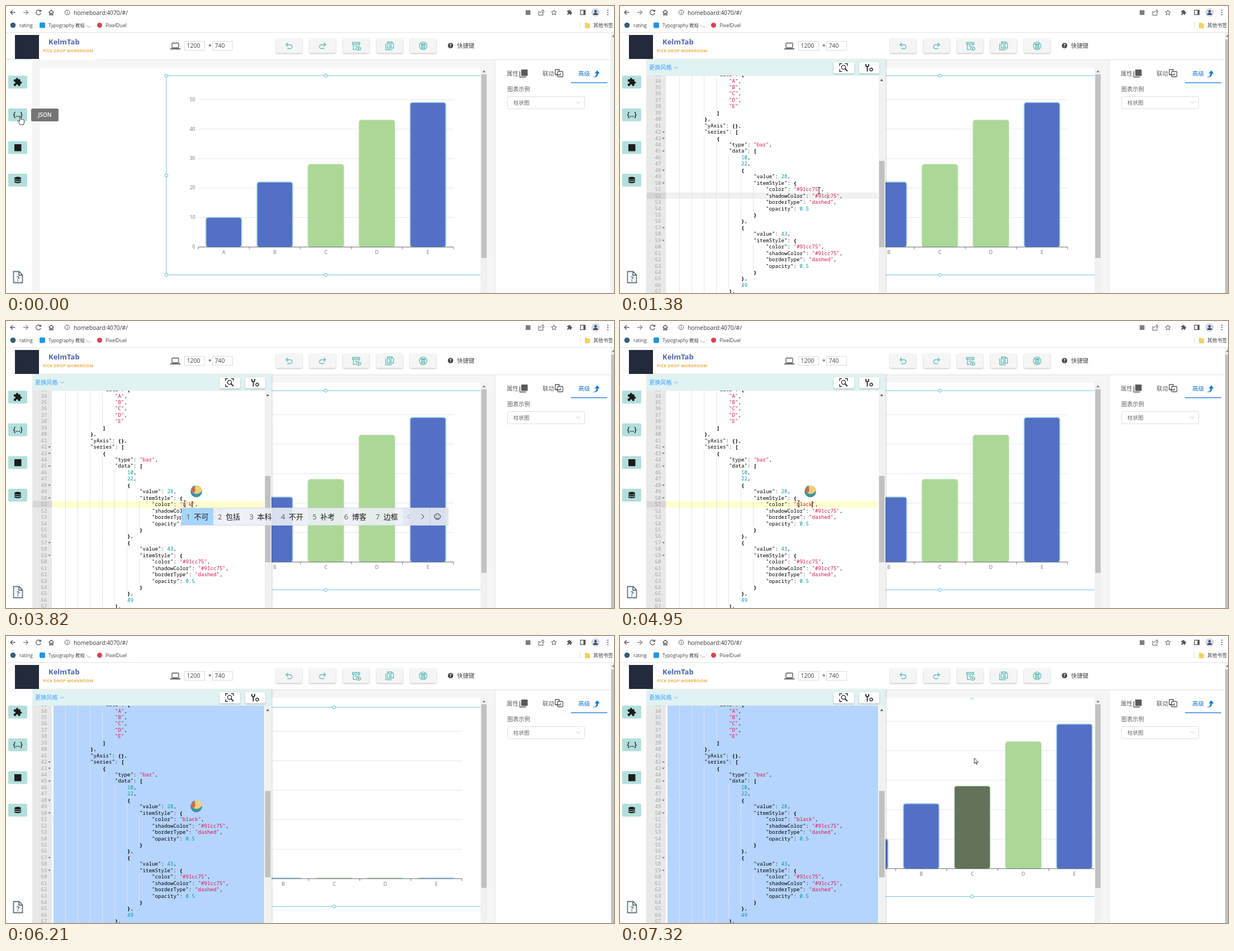
Recreate the animation shown at these times as an HTML page. Size 1088 by 515 pixels, loop 8.18 s.

```html
<!DOCTYPE html>
<html lang="zh">
<head>
<meta charset="utf-8">
<style>
html, body { margin: 0; width: 100%; height: 100%; overflow: hidden; background: #fff; }
#stage { position: absolute; left: 0; top: 0; width: 1088px; height: 515px; overflow: hidden; }
#scene { position: absolute; left: 0; top: 0; }
text, #ime { font-family: "Open Sans", "Noto Sans CJK SC", "Noto Sans CJK", sans-serif; white-space: pre; }
.mid { text-anchor: middle; }
.end { text-anchor: end; }
.ln { fill: none; stroke: currentColor; stroke-width: 1.3; }
.thin { stroke-width: 1; }
.thick { stroke-width: 1.8; }
.code text { font: 9.167px "Noto Sans Mono", monospace; }
.code .str { fill: #d14; }
.code .num { fill: #099; }
.code .br { font-weight: bold; }
.key { fill: #f5f5f5; filter: drop-shadow(0 1.5px 1px rgba(0,0,0,.28)); }
.teal { color: #5dbab8; }

#tip, #thumb, #drawer, #hand, #beam, #arrow, #bowl, #drag, .bar, #dark { animation: 8180ms linear infinite; }
#tip { animation-name: tip; }
#thumb { animation-name: thumb; }
#drawer { animation-name: drawer; }
#hand { animation-name: hand; }
#beam { animation-name: beam; }
#arrow { animation-name: arrow; }
#bowl { animation-name: bowl; transform-origin: 340px 306px; }
#drag { animation-name: drag; }
.bar { animation-name: grow; rx: 4px; filter: drop-shadow(0 0 1.2px var(--glow)); }
#dark { animation-name: grow, darken; }

@keyframes tip { 0%, 5% { opacity: 1 } 6.8%, 100% { opacity: 0 } }
@keyframes thumb { 0%, 4.9% { opacity: 0 } 4.91%, 100% { opacity: 1 } }
@keyframes drawer {
  0%, 4.9% { transform: translateX(-432px); animation-timing-function: cubic-bezier(.4,0,.2,1) }
  8.2%, 100% { transform: none }
}
@keyframes hand {
  0%, 4.6% { transform: translate(26px,205px); opacity: 1 }
  6.1% { transform: translate(48px,215px); opacity: 1 }
  6.11%, 100% { transform: translate(48px,215px); opacity: 0 }
}
@keyframes beam {
  0%, 6.1% { transform: translate(48px,215px); opacity: 0 }
  6.11% { transform: translate(48px,215px); opacity: 1; animation-timing-function: ease-out }
  13.7% { transform: translate(366px,336px) }
  15.6%, 18.2% { transform: translate(356px,331px); animation-timing-function: ease-in-out }
  24.2%, 63.6% { transform: translate(320px,328px) }
  64.55%, 66.9% { transform: translate(372px,385px) }
  70.17% { transform: translate(436px,495px); opacity: 1 }
  70.18%, 100% { transform: translate(436px,495px); opacity: 0 }
}
@keyframes arrow {
  0%, 76.6% { transform: translate(584px,230px); opacity: 0 }
  76.61% { transform: translate(584px,230px); opacity: 1; animation-timing-function: ease-out }
  85.4%, 89.48% { transform: translate(626px,212px) }
  89.49%, 100% { transform: translate(634px,219px); opacity: 1 }
}
@keyframes bowl {
  0%, 24.93% { opacity: 0; transform: scale(.5) }
  24.94% { opacity: 1; transform: scale(.5) }
  27% { transform: scale(1.08) }
  28.5%, 76.5% { opacity: 1; transform: none }
  76.9%, 100% { opacity: 0; transform: none }
}
@keyframes drag {
  0%, 75.85% { transform: none }
  75.86%, 76.3% { transform: translate(15px,3px); animation-timing-function: ease-out }
  85.4%, 100% { transform: translate(58px,-15px) }
}
@keyframes grow {
  0%, 75.85% { y: var(--y); height: var(--h) }
  75.86%, 76.3% { y: 431.3px; height: .7px; animation-timing-function: cubic-bezier(.215,.61,.355,1) }
  87.8%, 100% { y: var(--y); height: var(--h) }
}
@keyframes darken { 0%, 76.3% { fill: #abd897 } 76.31%, 100% { fill: #62725b } }

#ime {
  position: absolute; left: 314px; top: 335px; height: 30px; display: none;
  border: 1px solid #d3d8e4; border-width: 1px 0; 
  background: rgba(236,239,246,.88); font-size: 13px; line-height: 30px; color: #1c1c1c;
}
#ime span { padding: 0 8px 0 8.5px; flex: none; }
#ime span:first-child { background: #a5d5fb; }
#ime i { font-style: normal; color: #555; display: inline-block; width: 14px; }
#ime svg { flex: none; background: rgba(218,223,238,.6); color: #222; }
</style>
</head>
<body>
<div id="stage">
<svg id="scene" width="1088" height="515" viewBox="0 0 1088 515">
  <defs>
    <clipPath id="board"><rect x="61" y="111" width="788" height="404"/></clipPath>
    <clipPath id="pane"><rect x="47" y="125" width="428" height="390"/></clipPath>
    <path id="puzzle" d="M20.5 11H19V7c0-1.1-.9-2-2-2h-4V3.500a2.500 2.500 0 0 0-5 0V5H4c-1.1 0-2 .9-2 2v3.800h1.500a2.700 2.700 0 0 1 0 5.400H2V20c0 1.1.9 2 2 2h3.800v-1.500a2.700 2.700 0 0 1 5.400 0V22H17c1.1 0 2-.9 2-2v-4h1.500a2.500 2.500 0 0 0 0-5z"/>
    <path id="down" d="M-3.5-1.8L0 1.8L3.5-1.8"/>
  </defs>
  <rect width="1088" height="515" fill="#fff"/>

  <!-- work area -->
  <rect x="47" y="97" width="828" height="418" fill="#f5f5f5"/>
  <rect x="61" y="111" width="788" height="404" fill="#fff"/>
  <g clip-path="url(#board)"><g id="drag"></g></g>
  <rect x="849.5" y="111" width="11.5" height="404" fill="#f1f1f1"/>
  <rect x="850.5" y="122.5" width="9.5" height="329.5" fill="#c1c1c1"/>
  <path d="M852.5 119h5.5l-2.750-3.5z" fill="#777"/>

  <!-- header -->
  <rect x="0" y="48" width="1082" height="49" fill="#fff"/>
  <path d="M162 96.5H1082" stroke="#e2e2e2"/>
  <rect x="16" y="52" width="43" height="43" fill="#232a3a"/>
  <text x="76" y="69" font-size="13" font-weight="700" fill="#4d64ad">KelmTab</text>
  <text x="66" y="82.5" font-size="7.4" font-weight="700" fill="#eeb04c" letter-spacing=".15">PICK DROP WORKROOM</text>
  <g class="ln" color="#555"><rect x="297" y="66.5" width="12" height="8.5" rx="1"/><path d="M294 77h18" stroke-width="1.8"/></g>
  <g fill="#fff" stroke="#dcdcdc"><rect x="319.5" y="63.5" width="36" height="16"/><rect x="369.5" y="63.5" width="36" height="16"/></g>
  <g font-size="10.5" fill="#444"><text x="323.5" y="75.3">1200</text><text x="362" y="76">*</text><text x="373.5" y="75.3">740</text></g>
  <g id="keys"></g>
  <g class="ln teal">
    <path d="M501.5 69.5h7a3.5 3.5 0 0 1 0 7h-5M504.5 66l-3.5 3.5l3.5 3.5"/>
    <path d="M571.5 69.5h-7a3.5 3.5 0 0 0 0 7h5M568.5 66l3.5 3.5l-3.5 3.5"/>
    <path d="M620 65.5h13v3h-13zM621.5 69v9h4M624 72h5M631.5 69v3"/><ellipse cx="631" cy="76.5" rx="4" ry="2.8"/><circle cx="631" cy="76.5" r=".8"/>
    <path d="M682.5 64.5h8l3 3v8h-11zM679.5 67v11.5h11M685 65v3h5v-3"/><circle cx="688" cy="72" r="1.6"/>
    <circle cx="746.5" cy="71.5" r="6.8"/><path d="M743.5 69.5h6v6h-6zM742.5 68h8M745.5 71v3M747.5 71v3"/>
  </g>
  <circle cx="795.5" cy="71" r="4.8" fill="#444"/><text class="mid" x="795.5" y="74" font-size="8" font-weight="700" fill="#fff">?</text>
  <text x="807" y="75" font-size="10.4" fill="#444">快捷键</text>

  <!-- property panel -->
  <rect x="875" y="97" width="207" height="418" fill="#fff"/>
  <path d="M875.5 97V515" stroke="#e6e6e6"/>
  <g font-size="10.6" fill="#606266">
    <text x="896" y="125">属性</text><text x="960" y="125">联动</text>
    <text x="1024" y="125" fill="#1976d2">高级</text><text x="897" y="153" font-size="10.2">图表示例</text>
  </g>
  <path class="ln" color="#555" d="M919.5 117v10.5h11"/><rect x="922" y="114" width="11.5" height="11.5" rx="1" fill="#5a5a5a"/>
  <g class="ln" color="#555"><path d="M990 117.5v-3.5h-7v9h3.5M990 114h-7"/><rect x="987" y="117.5" width="9.5" height="9.5" rx="1"/><path d="M983 123.5h9v-3"/></g>
  <path d="M1048.5 127c6 .5 8-1.5 8-6h-3l4.5-5.5l4.5 5.5h-3c0 5-2.5 8-11 6z" fill="#1976d2"/>
  <rect x="1011" y="137" width="65" height="1.3" fill="#1976d2"/>
  <rect x="897.5" y="162.5" width="138" height="22" rx="2.5" fill="#fff" stroke="#dcdfe6"/>
  <text x="908" y="176.5" font-size="9.5" fill="#606266">柱状图</text>
  <use href="#down" class="ln thin" color="#c0c4cc" transform="translate(1024 173)"/>
  <rect x="1082" y="48" width="6" height="467" fill="#f1f1f1"/>
  <rect id="thumb" x="1083" y="60" width="5" height="455" fill="#c1c1c1"/>
  <path d="M1084 55.5h4v-4z" fill="#777"/>

  <!-- editor drawer -->
  <g id="drawer">
    <rect x="47" y="96" width="428" height="419" fill="#fff" style="filter:drop-shadow(1px 0 1.5px rgba(0,0,0,.2))"/>
    <rect x="47" y="96" width="428" height="29.5" fill="#e0f2f1"/>
    <text x="52" y="114" font-size="10.2" fill="#409eff">更换风格</text>
    <use href="#down" class="ln thin" color="#409eff" transform="translate(100.5 110.5) scale(.85)"/>
    <rect class="key" x="382" y="101" width="37" height="20" rx="2" style="fill:#fff"/>
    <rect class="key" x="428" y="101" width="36" height="20" rx="2" style="fill:#fff"/>
    <g class="ln" color="#222"><path d="M393 107.5v-4h4M403 103.5h4v4M393 113.5v4h4"/><circle cx="400" cy="110" r="3.6"/><path d="M402.5 112.5l4.5 4.5" stroke-width="1.8"/>
      <path d="M440 104v3.5l2.5 2l2.5-2V104M442.5 109.5v8" stroke-width="1.8"/><circle cx="449.5" cy="114" r="2.5" stroke-width="2" stroke-dasharray="1.7 .5"/></g>
    <g class="code" clip-path="url(#pane)">
      <rect x="47" y="125" width="35" height="390" fill="#e8e8e8"/>
      <rect id="gutterRow" x="48" width="34" height="11.5"/>
      <rect id="row" x="82" width="380" height="11.5"/>
      <rect id="picked" x="85" y="125" width="377" height="390" fill="#b5d5ff"/>
      <g id="lines"></g>
      <rect id="caret" width="1.2" height="11.5" fill="#000"/>
    </g>
    <rect x="463" y="125.5" width="11.5" height="390" fill="#f1f1f1"/>
    <rect x="463.5" y="278" width="10" height="155" fill="#c1c1c1"/>
    <path d="M465.5 134.5h5.5l-2.750-3.5z" fill="#555"/>
  </g>

  <!-- side bar -->
  <rect x="0" y="97" width="47" height="418" fill="#fff"/>
  <g id="side"></g>
  <use href="#puzzle" transform="translate(12.5 128) scale(.7)" fill="#1c1c1c"/>
  <text class="mid" x="21" y="199.3" font-size="12" font-weight="600" fill="#1c1c1c" letter-spacing="-.4">{...}</text>
  <rect x="15" y="248" width="12.5" height="12.5" fill="#1c1c1c"/>
  <g fill="#1c1c1c"><ellipse cx="21" cy="309" rx="6" ry="2.5"/><path id="disc" d="M15 310.5c1.5 2.3 10.5 2.3 12 0v2.3c-1.5 2.3-10.5 2.3-12 0z"/><use href="#disc" y="3.5"/></g>
  <path class="ln thick" color="#5f7480" d="M13.5 476.5h10l6 6v14h-16zM23 477v6h6"/>
  <text class="mid" x="21.5" y="493.5" font-size="12" font-weight="700" fill="#5f7480">?</text>

  <!-- browser bars -->
  <rect width="1088" height="47.5" fill="#fff"/><path d="M0 47.5H1088" stroke="#e3e3e3"/>
  <g class="ln" color="#55585c">
    <path d="M16.5 11.5h-8.5M12 7.5l-4 4l4 4"/><path d="M31 11.5h8.5M35.5 7.5l4 4l-4 4" stroke="#85888c"/>
    <path d="M61.5 9a4.3 4.3 0 1 0 .6 4M62.5 6.5v3h-3"/><path d="M76.5 11.5l4.5-4.2l4.5 4.2M78 11v5h2v-3h2v3h2v-5"/>
    <circle cx="109.5" cy="11.5" r="4.2" stroke-width="1"/><path d="M109.5 9v1M109.5 11v3" stroke-width="1"/>
    <path d="M955 10h-2v6.5h8v-3M955.5 13c.5-3 2.5-4 5-4v-2.5l2.5 3.5l-2.5 3v-2" stroke-width="1"/>
    <path d="M980.5 7l1.3 3.2l3.4.2l-2.6 2.2l.9 3.4l-3-1.9l-3 1.9l.9-3.4l-2.6-2.2l3.4-.2z" stroke-width="1"/>
    <rect x="1028" y="7.5" width="8.5" height="8"/><path d="M1034.8 8v7" stroke-width="3"/>
  </g>
  <rect x="930" y="7.5" width="8.5" height="8.5" fill="#7a7d82"/>
  <use href="#puzzle" transform="translate(1003.5 6.5) scale(.42)" fill="#55585c"/>
  <circle cx="1055" cy="11.5" r="7.5" fill="#d3d8e6"/><g fill="#3d4a63"><circle cx="1055" cy="9.5" r="2.2"/><path d="M1050.5 16c0-5 9-5 9 0z"/></g>
  <g fill="#55585c"><circle cx="1077" cy="7.5" r="1.1"/><circle cx="1077" cy="11.5" r="1.1"/><circle cx="1077" cy="15.5" r="1.1"/></g>
  <text x="121" y="15.5" font-size="10.3" fill="#333">homeboard:4070/#/</text>
  <circle cx="12.5" cy="34.5" r="4.8" fill="#35607a"/><rect x="60" y="29.5" width="10" height="10" rx="2" fill="#2196e3"/><circle cx="167.5" cy="34.5" r="4.5" fill="#d8434e"/>
  <g font-size="8.8" fill="#3c4043"><text x="24" y="38">rating</text><text x="76" y="38" font-size="8.4">Typography 教程 -...</text><text x="178" y="38">PixelDuel</text><text x="1051" y="38">其他书签</text></g>
  <path d="M1027.5 29v11" stroke="#ddd"/><path d="M1036 30h4l1 1.5h4v8.5h-9z" fill="#f5cf66"/>

  <g id="tip"><rect x="45" y="184" width="49" height="23" rx="2.5" fill="#757575"/><text class="mid" x="69.5" y="199" font-size="10" font-weight="600" fill="#fff">JSON</text></g>

  <g id="bowl">
    <circle cx="340.5" cy="306" r="10.3" fill="#3a93a5"/>
    <path d="M331 303q2-8 10-8q8 0 10 8q-3 7-10 7.5q-7-.5-10-7.5z" fill="#f2cf7b"/>
    <path d="M331 303.5q1-6 5-8l3 7l-2 6q-4-1-6-5z" fill="#d9634a"/>
    <path d="M333 299l4-4l2 3l-3 3z" fill="#5f9c86"/>
  </g>
</svg>
<div id="ime"></div>
<svg id="pointers" width="1088" height="515" style="position:absolute;left:0;top:0">
  <path id="hand" d="M-2 6l-2.5-4c-.8-1.5 1-2 1.8-1l1.2 1.2V-5c0-1.8 2.2-1.8 2.2 0v3.5c.5-.8 2-.6 2 .4c.6-.7 2-.4 2 .6c.7-.5 1.8-.1 1.8.9V4l-1 4H-.8z" fill="#fff" stroke="#222" stroke-width=".9"/>
  <path id="beam" class="ln thin" color="#222" d="M-2-5.5h1.5l.5.5l.5-.5H2M0-5V5M-2 5.5h1.5L0 5l.5.5H2"/>
  <path id="arrow" d="M0 0v10l2.3-2.1l1.5 3.4l1.5-.7l-1.5-3.2H7z" fill="#fff" stroke="#222" stroke-width=".9"/>
</svg>
</div>

<script>
const LOOP = 8180, CHAR = 5.5, LEFT = 85, PITCH = 11.45, FIRST = 33;
const $ = id => document.getElementById(id);
const add = (id, html) => $(id).insertAdjacentHTML('beforeend', html);
const midY = n => 134.3 + (n - 34) * PITCH;

// Header and side buttons
for (let i = 0; i < 5; i++) add('keys', `<rect class="key" x="${483 + 60 * i}" y="58" width="47" height="26.5" rx="2.5"/>`);
for (let i = 0; i < 4; i++) add('side', `<rect x="4" y="${125 + 58.7 * i}" width="34" height="23" rx="2" fill="#b2dfdb"/>`);

// Bar chart
const BASE = 432.5, UNIT = 5.29, X0 = 344, STEP = 91.35;
for (let v = 0; v <= 50; v += 10) {
  const y = BASE - v * UNIT;
  if (v) add('drag', `<path d="M${X0} ${y}H801" stroke="#e0e6f1"/>`);
  add('drag', `<text class="end" x="338.5" y="${y + 2.6}" font-size="8.6" fill="#6e7079">${v}</text>`);
}
[10, 22, 28, 43, 49].forEach((v, i) => {
  const mid = X0 + STEP * (i + .5), green = i === 2 || i === 3, h = v * UNIT;
  const look = green ? 'fill="#abd897" stroke="#a4d69b" stroke-dasharray="2 1"' : 'fill="#5470c6" stroke="#a3d3e8"';
  add('drag', `<rect class="bar" ${i === 2 ? 'id="dark"' : ''} x="${mid - 31.7}" width="63.4" ${look}
    style="--y:${BASE - h}px;--h:${h}px;--glow:${green ? '#c5e6b8' : '#8cc8d8'}"/>
    <text class="mid" x="${mid}" y="444.5" font-size="8.6" fill="#6e7079">${'ABCDE'[i]}</text>`);
});
let axis = `M${X0} ${BASE}H801`;
for (let i = 0; i < 6; i++) axis += `M${X0 + STEP * i} ${BASE}v4`;
add('drag', `<path d="${axis}" stroke="#6e7079"/><rect x="287" y="125" width="570" height="357.5" fill="none" stroke="#70c6f4"/>`);
for (const [x, y] of [[287, 125], [572, 125], [287, 304], [287, 482.5], [572, 482.5]])
  add('drag', `<circle cx="${x}" cy="${y}" r="2.8" fill="#fff" stroke="#59bdf2"/>`);

// Editor text
const item = value => ({ value, itemStyle: { color: '#91cc75', shadowColor: '#91cc75', borderType: 'dashed', opacity: .5 } });
const tree = { option: { body: {
  xAxis: { data: [...'ABCDE'] }, yAxis: {},
  series: [{ type: 'bar', data: [10, 22, item(28), item(43), 49], end: 0 }]
} } };
const source = JSON.stringify(tree, null, 4).split('\n').slice(4, 39);
const paint = s => s.trim().replace(/("[^"]*")(:?)|(\d[\d.]*)|([[\]{}]+)/g, (m, str, colon, num) => {
  const kind = str ? (colon ? 'prop' : 'str') : num ? 'num' : 'br';
  return `<tspan class="${kind}">${m}</tspan>`;
});
source.forEach((s, i) => {
  const n = FIRST + i, y = midY(n), indent = s.search(/\S/);
  let guides = '';
  for (let k = 1; k < indent / 4; k++) guides += `M${LEFT + 22 * k - .5} ${y - 5.7}v${PITCH}`;
  add('lines', `<path d="${guides}" stroke="#e2e4e7"/>
    <text class="end" x="73.5" y="${y + 3.2}" fill="#a3a3a3">${n}</text>
    <text id="l${n}" x="${LEFT + indent * CHAR}" y="${y + 3.2}">${paint(s)}</text>`);
  if (/[[{]$/.test(s)) add('lines', `<path d="M75.5 ${y - 1}h4.5l-2.25 2.8z" fill="#777"/>`);
});

// Typing: time, text before the caret, text after it, candidates
const single = '不 把 吧 被 本 比 并';
const pair = '不了 保留 暴露 玻璃 比例 便利 部落';
const long = '不来厂库 白蓝彩块 布拉车库 不落船口 帮练查考';
const typing = [
  [0, '#91cc75', ''], [1450, '#91cc7', '5'],
  [2100, '#91cc', '5'], [2240, '#91c', '5'], [2380, '#91', '5'], [2520, '#9', '5'], [2660, '#', '5'],
  [2900, '', '5'], [3050, '', ''],
  [3440, 'b', '', single],
  [3820, "b'k", '', '不可 包括 本科 不开 补考 博客 边框'],
  [4220, 'b', '', single],
  [4420, "b'l", '', pair], [4490, "b'la", '', pair],
  [4560, "b'la'c", '', long], [4690, "b'la'c'k", '', long],
  [4950, 'black', '']
];
const tools = `<svg width="82" height="30"><g class="ln thin">
  <path d="M13 10.5l-4.5 4.5l4.5 4.5" stroke="#999"/><path d="M33.5 10.5l4.5 4.5l-4.5 4.5"/><path d="M48.5 0v30" stroke="#c3cadb"/>
  <circle cx="62" cy="15" r="5.3"/><path d="M59 16.5q3 3.5 6 0M60 12.5v1.5M64 12.5v1.5"/></g></svg>`;

let shown;
function type(step) {
  if (step === shown) return;
  shown = step;
  const [, before, after, words] = step;
  $('l51').innerHTML = paint(`"color": "${before}${after}",`);
  $('ime').style.display = words ? 'flex' : 'none';
  if (words) $('ime').innerHTML = words.split(' ').map((w, i) => `<span><i>${i + 1}</i>${w}</span>`).join('') + tools;
}

function draw(t) {
  const step = typing.findLast(s => s[0] <= t);
  type(step);
  const idle = t < 1450, blurred = t >= 6070, picked = t >= 6170;
  const n = idle ? 52 : 51, top = midY(n) - 5.8;
  for (const id of ['row', 'gutterRow', 'caret']) $(id).setAttribute('y', top);
  $('row').setAttribute('fill', idle || blurred ? '#f1f1f1' : '#ffffcc');
  $('gutterRow').setAttribute('fill', '#d6d6d6');
  $('gutterRow').style.opacity = picked ? 0 : 1;
  $('picked').style.opacity = picked ? 1 : 0;
  const col = idle ? 20 : 10 + step[1].length;
  $('caret').setAttribute('x', 261 + col * CHAR);
  $('caret').style.opacity = blurred || (t >= 5450 && t < 5930) ? 0 : idle ? .35 : 1;
}

let start;
function frame(now) {
  start ??= now;
  draw((now - start) % LOOP);
  requestAnimationFrame(frame);
}
draw(0);
requestAnimationFrame(frame);
</script>
</body>
</html>
```
